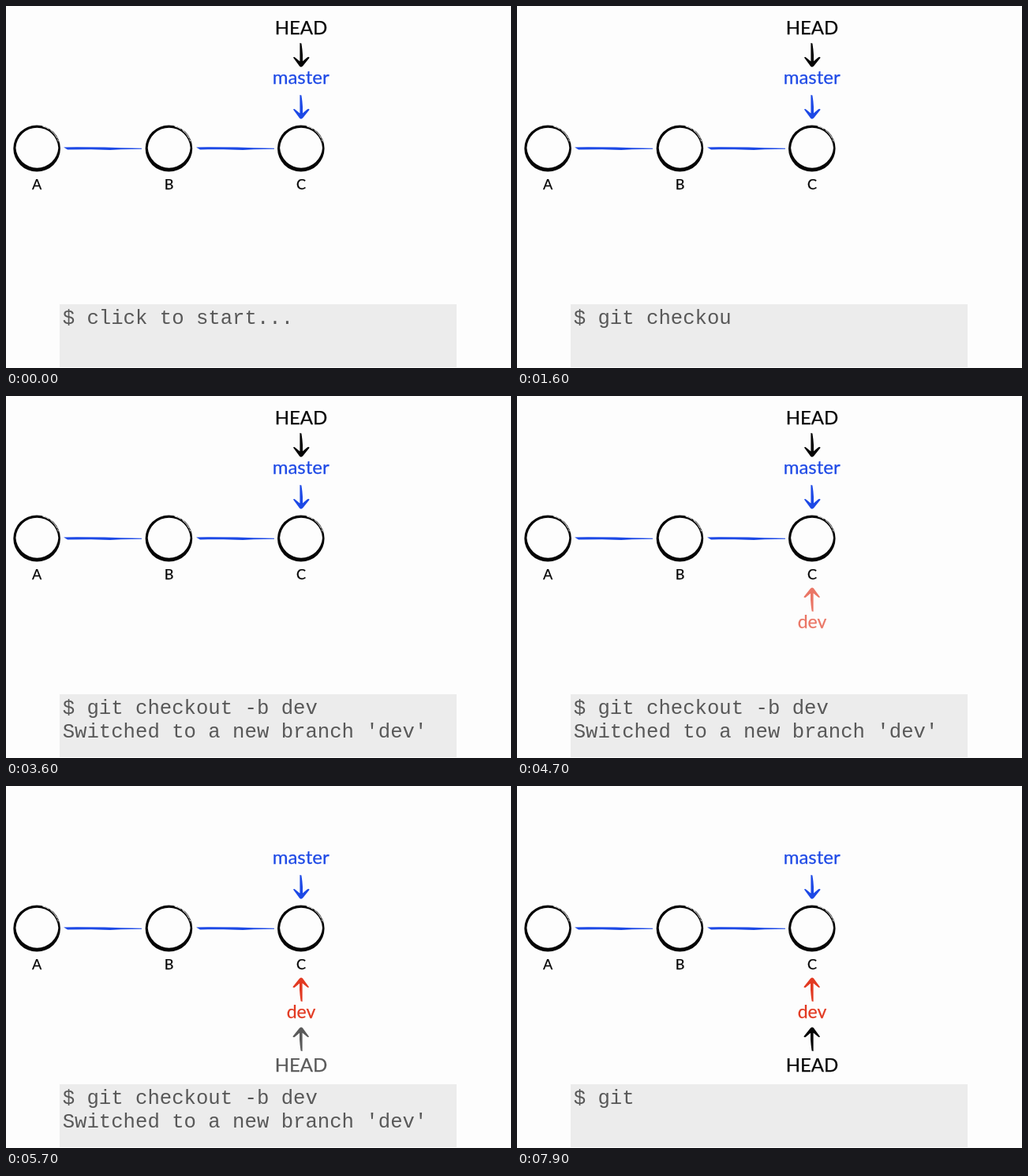
An HTML page for the animation above (8000 ms loop, 640 by 460 pixels).

```html
<!DOCTYPE html>
<html lang="en">
<head>
<meta charset="utf-8">
<title>git checkout -b</title>
<style>
  html, body { margin: 0; width: 100%; height: 100%; overflow: hidden; background: #fdfdfd; }
  svg { display: block; width: 640px; height: 460px; }
  .label { font: 24px Lato, sans-serif; text-anchor: middle; stroke-width: .25px; }
  .commit { font-size: 18px; }
  .blue { fill: #1d49e6; stroke: #1d49e6; }
  .red { fill: #e23a22; stroke: #e23a22; }
  .black { fill: #050505; stroke: #050505; }
  .ink { stroke: none; }
  #terminal { font: 25.65px "Liberation Mono", "Courier New", monospace; fill: #585858; }
</style>
</head>
<body>
<svg viewBox="0 0 640 460">
  <defs>
    <!-- brush strokes: arrow points down from (0,0) to (0,31) -->
    <path id="arrow" class="ink" d="M-1.6 0L.4 .6Q1.6 8 2 15L2 28H-1.6Q-1.6 14-1.6 0Z
      M-10 18.4Q-9 17-7.6 18.4L-1.4 23.4H1.6L8.2 18Q10 17.2 10.6 18.8L2.6 28.8Q.2 32-2 29.4Z"/>
    <path id="link" class="ink" d="M73 179.6L90 179.3L125 179.5L146 180.2L172 180.8V181.7L146 182.2L132 182.9L108 182.3L78 182.4Z"/>
    <g id="node">
      <path class="ink" fill-rule="evenodd" d="M-30 0A29.8 29.6 0 0 1 29.6 0A29.8 29.6 0 0 1-30 0Z
        M-26.9 -.8A27 27.2 0 0 1 27 -.8A27 27.2 0 0 1-26.9 -.8Z"/>
      <path d="M7-28.2A28.4 28.4 0 0 1 27-9" fill="none" stroke="#fdfdfd" stroke-width=".9" stroke-dasharray="9 2 14 1"/>
    </g>
  </defs>

  <g class="blue">
    <use href="#link"/>
    <use href="#link" x="168"/>
    <text class="label" x="373.7" y="99">master</text>
    <use href="#arrow" x="374" y="113"/>
  </g>
  <g class="black">
    <use href="#node" x="39.3" y="181"/>
    <use href="#node" x="206.6" y="181"/>
    <use href="#node" x="374" y="181"/>
    <text class="label commit" x="39" y="232.7">A</text>
    <text class="label commit" x="206.5" y="232.7">B</text>
    <text class="label commit" x="374" y="232.7">C</text>
  </g>
  <g id="oldHead" class="black">
    <text class="label" x="374" y="36">HEAD</text>
    <use href="#arrow" x="374" y="47"/>
  </g>
  <g id="dev" class="red">
    <use href="#arrow" transform="translate(374 274) rotate(180)"/>
    <text class="label" x="374" y="295" style="font-size: 23px">dev</text>
  </g>
  <g id="newHead" class="black">
    <use href="#arrow" transform="translate(374 337) rotate(180)"/>
    <text class="label" x="374" y="363">HEAD</text>
  </g>

  <rect x="68" y="379" width="503" height="80" fill="#ececec"/>
  <g id="terminal">
    <text x="71.7" y="404"></text>
    <text x="71.7" y="433.5"></text>
    <text x="71.7" y="463.5"></text>
  </g>
</svg>
<script>
const LOOP = 8000, CHAR_MS = 51;
const COMMAND = "git checkout -b dev";
const REPLY = "Switched to a new branch 'dev'";
const byId = id => document.getElementById(id);
const lines = byId("terminal").children;

const typed = (t, start) => Math.max(0, Math.floor((t - start) / CHAR_MS));

// Eased 0..1 ramp
function fade(t, start, duration) {
  const p = Math.min(1, Math.max(0, (t - start) / duration));
  return (1 - Math.cos(p * Math.PI)) / 2;
}

function terminalLines(t) {
  if (t < 1100) return ["$ click to start...", "", ""];
  if (t >= 7600) return ["$ " + "git".slice(0, typed(t, 7740)), "", ""];
  const count = typed(t, 1010);
  return [
    "$ " + COMMAND.slice(0, count),
    REPLY.slice(0, Math.max(0, count - COMMAND.length)),
    t < 6600 ? "" : "$ click to continue..."
  ];
}

function draw(t) {
  terminalLines(t).forEach((text, i) => {
    if (lines[i].textContent !== text) lines[i].textContent = text;
  });
  byId("dev").style.opacity = fade(t, 4080, 1000);
  byId("oldHead").style.opacity = 1 - fade(t, 5100, 500);
  byId("newHead").style.opacity = fade(t, 5100, 1000);
}

const origin = performance.now();
function frame() {
  draw((performance.now() - origin) % LOOP);
  requestAnimationFrame(frame);
}
frame();
</script>
</body>
</html>
```
